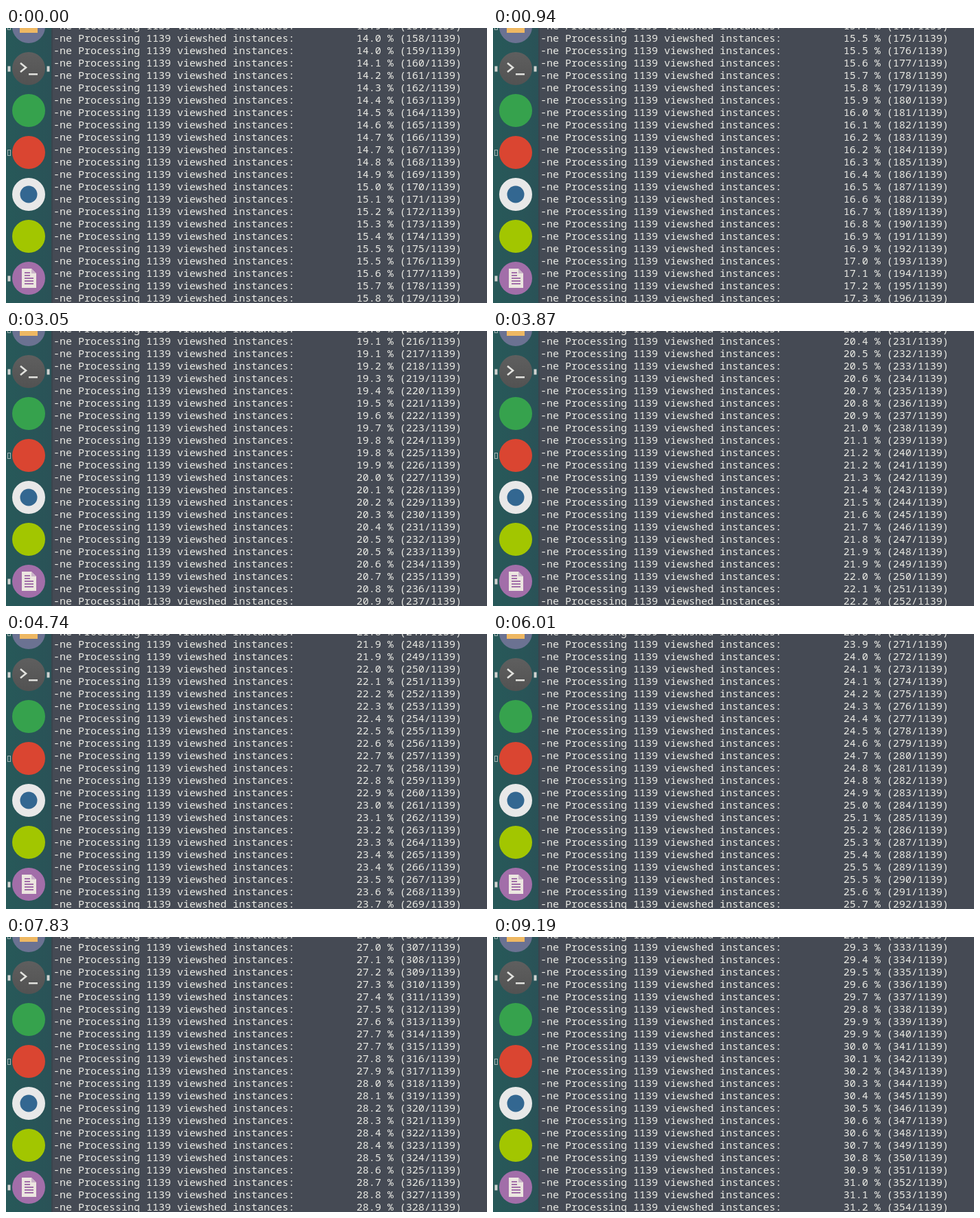
An HTML page with a canvas for the animation above (9.27 s loop, 700 px wide and 400 px high).

```html
<!DOCTYPE html>
<html lang="en">
<head>
<meta charset="utf-8">
<title>Viewshed progress</title>
<style>
  html, body { margin: 0; width: 100%; height: 100%; overflow: hidden; background: #454a54; }
  canvas { display: block; width: 700px; height: 400px; }
</style>
</head>
<body>
<canvas id="stage" width="700" height="400"></canvas>
<script>
const ctx = document.getElementById('stage').getContext('2d');
const LOOP = 9270, TOTAL = 1139, ROW = 18;

// [time, instances done]: a nearly steady rate with one short stall
const progress = [
  [0, 179], [430, 187], [620, 187], [620, 190], [1730, 211], [3050, 237],
  [4740, 269], [6010, 292], [7830, 328], [9190, 354], [LOOP, 354]
];

function countAt(t) {
  const i = progress.findIndex(([time]) => time > t);
  const [t0, n0] = progress[i - 1], [t1, n1] = progress[i];
  return Math.floor(n0 + (n1 - n0) * (t - t0) / (t1 - t0) + 0.25);
}

function rect(color, x, y, w, h) {
  ctx.fillStyle = color;
  ctx.fillRect(x, y, w, h);
}

function disc(color, y, r = 24) {
  ctx.fillStyle = color;
  ctx.beginPath();
  ctx.arc(33, y, r, 0, Math.PI * 2);
  ctx.fill();
}

function poly(color, points) {
  ctx.fillStyle = color;
  ctx.beginPath();
  points.forEach(([x, y]) => ctx.lineTo(x, y));
  ctx.fill();
}

function gradient(x, y, from, to) {
  const g = ctx.createLinearGradient(0, 0, x, y);
  g.addColorStop(0, from);
  g.addColorStop(1, to);
  return g;
}

function solidMark(x, y) {
  rect('#d0d2d0', x + 0.5, y - 4, 4, 8);
}

function hollowMark(y) {
  ctx.strokeStyle = '#a3b3b3';
  ctx.lineWidth = 1;
  ctx.strokeRect(2.5, y - 3.5, 4, 8);
}

function drawTerminalIcon() {
  disc(gradient(0, 83, '#686868', '#525252'), 59);
  ctx.strokeStyle = '#e2e2de';
  ctx.lineWidth = 2.6;
  ctx.beginPath();
  ctx.moveTo(21, 51);
  ctx.lineTo(29, 57.5);
  ctx.lineTo(21, 64);
  ctx.stroke();
  rect('#e2e2de', 33, 66, 13, 2.5);
}

function drawDocumentIcon() {
  const ink = '#a26ea9';
  disc(ink, 364);
  poly('#ece6e0', [[23, 350], [37, 350], [44, 357], [44, 378], [23, 378]]);
  poly('#cbb4c9', [[37, 350], [44, 357], [37, 357]]);
  for (let i = 0; i < 5; i++) rect(ink, 27, 355 + i * 4, i < 2 ? 8 : 13, 2);
}

function drawDock() {
  rect(gradient(67, 0, '#275959', '#2a5257'), 0, 0, 67, 400);
  rect('#3b444d', 66, 0, 2, 400);

  disc('#6b7292', -2);
  rect('#eeb863', 20, -8, 26, 15);
  drawTerminalIcon();
  disc('#36a24d', 120);
  disc('#da4531', 181);
  disc('#e8e8e8', 242);
  disc('#336791', 242, 12.5);
  disc('#a2c600', 303);
  drawDocumentIcon();

  solidMark(2, 59.5);
  solidMark(59, 59.5);
  solidMark(2, 364.5);
  hollowMark(181);
  hollowMark(-2);
}

function drawLog(count) {
  rect('#454a54', 68, 0, 632, 400);
  ctx.font = '500 15px "Noto Sans Mono", "DejaVu Sans Mono", monospace';
  ctx.fillStyle = '#ecece6';
  for (let row = 0; row <= 22; row++) {
    const n = count - row, y = 398 - row * ROW;
    const percent = ((n + 1) / TOTAL * 100).toFixed(1);
    ctx.fillText(`-ne Processing ${TOTAL} viewshed instances:`, 69, y);
    ctx.fillText(`${percent} % (${n}/${TOTAL})`, 510, y);
  }
}

function frame() {
  drawLog(countAt(performance.now() % LOOP));
  drawDock();
  requestAnimationFrame(frame);
}
frame();
</script>
</body>
</html>
```
